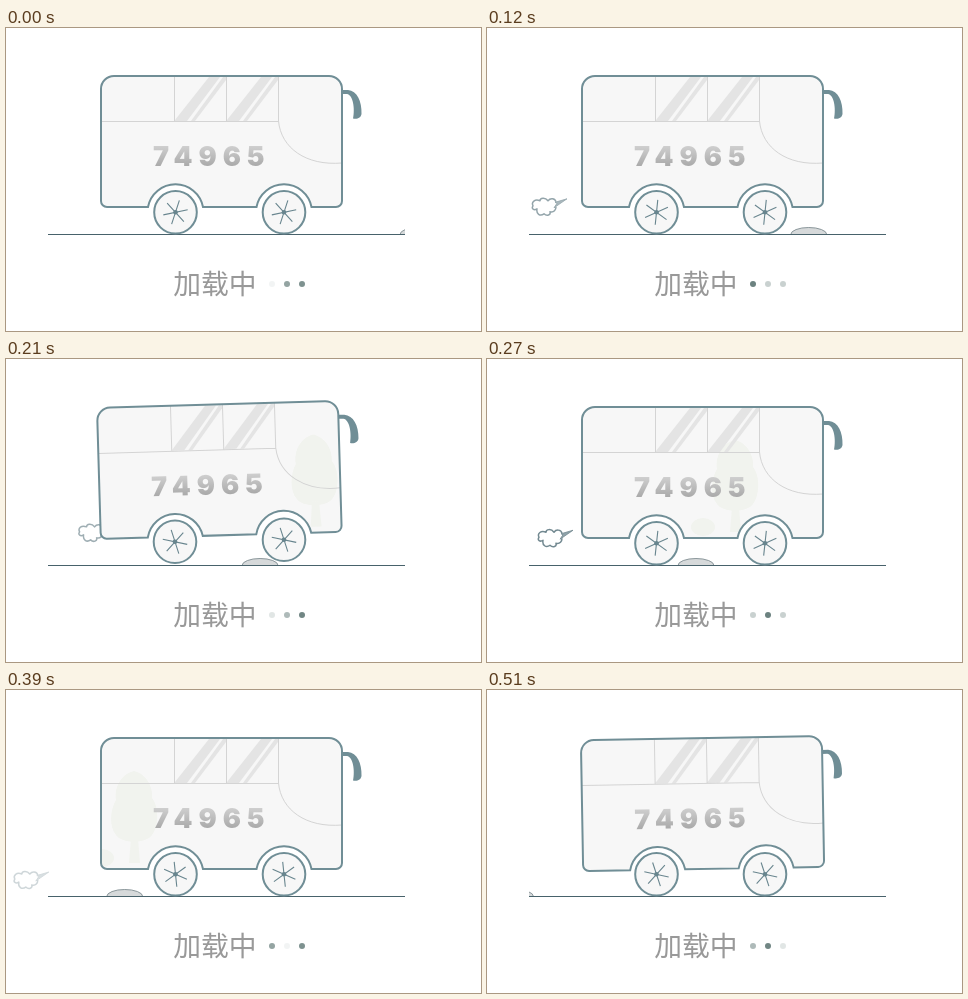
These frames come from a looping animation (475 px wide and 303 px high, 0.54 s). An HTML page:

```html
<!DOCTYPE html>
<html lang="zh">
<head>
<meta charset="utf-8">
<style>
html, body { margin: 0; height: 100%; overflow: hidden; background: #fff; }
svg { display: block; width: 475px; height: 303px; }
.line { fill: none; stroke: #d4d4d4; }
.steel { fill: #f7f7f7; stroke: #708e96; stroke-width: 2; }
.number { font: 900 27px Inter, Roboto, sans-serif; letter-spacing: 6px; }
.label { font: 27.8px "Noto Sans CJK SC", "Noto Sans CJK", sans-serif; fill: #999; }
</style>
</head>
<body>
<svg viewBox="0 0 475 303">
  <defs>
    <path id="shell" d="M108 48H323a13 13 0 0 1 13 13V173a6 6 0 0 1-6 6H305.5A28 28 0 0 0 250.5 179H197A28 28 0 0 0 142 179H101a6 6 0 0 1-6-6V61a13 13 0 0 1 13-13Z"/>
    <clipPath id="inside"><use href="#shell"/></clipPath>
    <clipPath id="road"><path d="M42 190H399V207H42Z"/></clipPath>
    <linearGradient id="shade" x2="0" y2="1">
      <stop offset=".2" stop-color="#cecece"/><stop offset=".85" stop-color="#a6a6a6"/>
    </linearGradient>
    <g id="puff" stroke="#718890" stroke-width="1.5" stroke-linejoin="round">
      <path fill="#fff" d="M25 5C24 1 19 1 17 4C14 0 9 1 9 4C4 2 0 5 2 9C0 12 3 14 6 12C5 17 9 20 13 17C16 20 20 18 19 15C23 16 25 13 25 10"/>
      <path fill="#8fa2a9" stroke-width=".8" d="M36 2L24 5.5L26 6.5L23 11Z"/>
    </g>
    <g id="glass" fill="#e4e4e4">
      <path d="M203 49H214L181 93H169V92Z"/>
      <path d="M217 49H220V52L189 93H185Z"/>
    </g>
    <g id="wheel">
      <circle class="steel" r="21.3"/>
      <path id="spokes" stroke="#68858e" stroke-width="1.1" d="M-12.5 0H12.5M-6.2-10.8L6.2 10.8M6.2-10.8L-6.2 10.8"/>
      <circle r="2.3" fill="#68858e"/>
    </g>
  </defs>

  <use id="puffA" href="#puff"/>
  <use id="puffB" href="#puff"/>
  <g clip-path="url(#road)">
    <ellipse id="stone" cy="206.5" rx="18" ry="7" fill="#d6d9da" stroke="#8b979b"/>
  </g>
  <path d="M42 206.5H399" stroke="#48626b"/>

  <g id="bus">
    <path fill="#708e96" d="M336 62H342C351 63 356 73 355.5 86C355 90 351 91.5 347 90.5C349 80 347 67 341 66H336Z"/>
    <use href="#shell" fill="#f7f7f7"/>
    <g clip-path="url(#inside)">
      <g id="tree" fill="#f1f3ee">
        <path d="M0 81C12 84 19 96 18 108C26 118 24 138 18 145C12 154-12 154-18 145C-25 137-24 120-18 110C-20 96-12 84 0 81Z"/>
        <path d="M-3 148H4L6 173H-5Z"/>
        <ellipse cx="-32" cy="168" rx="12" ry="9"/>
      </g>
    </g>
    <use href="#glass"/>
    <use href="#glass" x="52"/>
    <path class="line" d="M95 93.5H272.5M168.5 48V93M220.5 48V93M272.5 48V93C275 120 300 138 336 135"/>
    <text class="number" x="147" y="138" fill="url(#shade)">74965</text>
    <use href="#shell" class="steel" style="fill:none"/>
  </g>
  <use id="rear" href="#wheel"/>
  <use id="front" href="#wheel"/>

  <text class="label" x="167.2" y="266.3">加载中</text>
  <g id="dots" fill="#6c8280">
    <circle cx="266" cy="256" r="3"/><circle cx="281" cy="256" r="3"/><circle cx="296" cy="256" r="3"/>
  </g>
</svg>
<script>
const LOOP = 540, STEP = 30;
const el = id => document.getElementById(id);
const hump = (t, peak, width) => Math.max(0, 1 - Math.abs(t - peak) / width);

function place(id, x, y, angle = 0) {
  el(id).setAttribute("transform", `translate(${x} ${y}) rotate(${angle})`);
}

// Exhaust drifts left and down from behind the bus, fading in and out.
function puff(id, age, life, speed) {
  place(id, 95 - speed * age, 158 + .09 * age);
  const visible = age > 0 && age < life;
  el(id).setAttribute("opacity", visible ? Math.sin(Math.PI * age / life) : 0);
}

function draw(now) {
  const t = Math.floor(now % LOOP / STEP) * STEP;

  // The stone lifts the front wheel, then the rear one; a small sway follows.
  const front = hump(t, 180, 60), rear = hump(t, 330, 60), sway = hump(t, 510, 60);
  const tilt = 1.7 * rear - 3.35 * front - sway;
  const dx = 3.1 * rear - 4.3 * front, dy = -6.5 * rear - 5.3 * front;
  el("bus").setAttribute("transform", `translate(${dx} ${dy}) rotate(${tilt} 215.5 113.5)`);
  place("rear", 169.5 - front, 184.3 - 7 * rear - 3 * front);
  place("front", 278 - rear / 2, 184.3 - 7 * front);
  place("spokes", 0, 0, (t - 180) * .4);

  el("stone").setAttribute("cx", 412 - t * .752);
  place("tree", 518 - t - dx, 0);
  puff("puffA", t, 165, .425);
  puff("puffB", t - 145, 275, .36);

  // The highlight runs from right to left, one dot every 75 ms.
  const head = (120 - t) / 75;
  [...el("dots").children].forEach((dot, i) => {
    const wave = (1 + Math.cos((i - head) * 2 * Math.PI / 3)) / 2;
    dot.setAttribute("opacity", .06 + .94 * wave ** .8);
  });
  requestAnimationFrame(draw);
}
requestAnimationFrame(draw);
</script>
</body>
</html>
```
